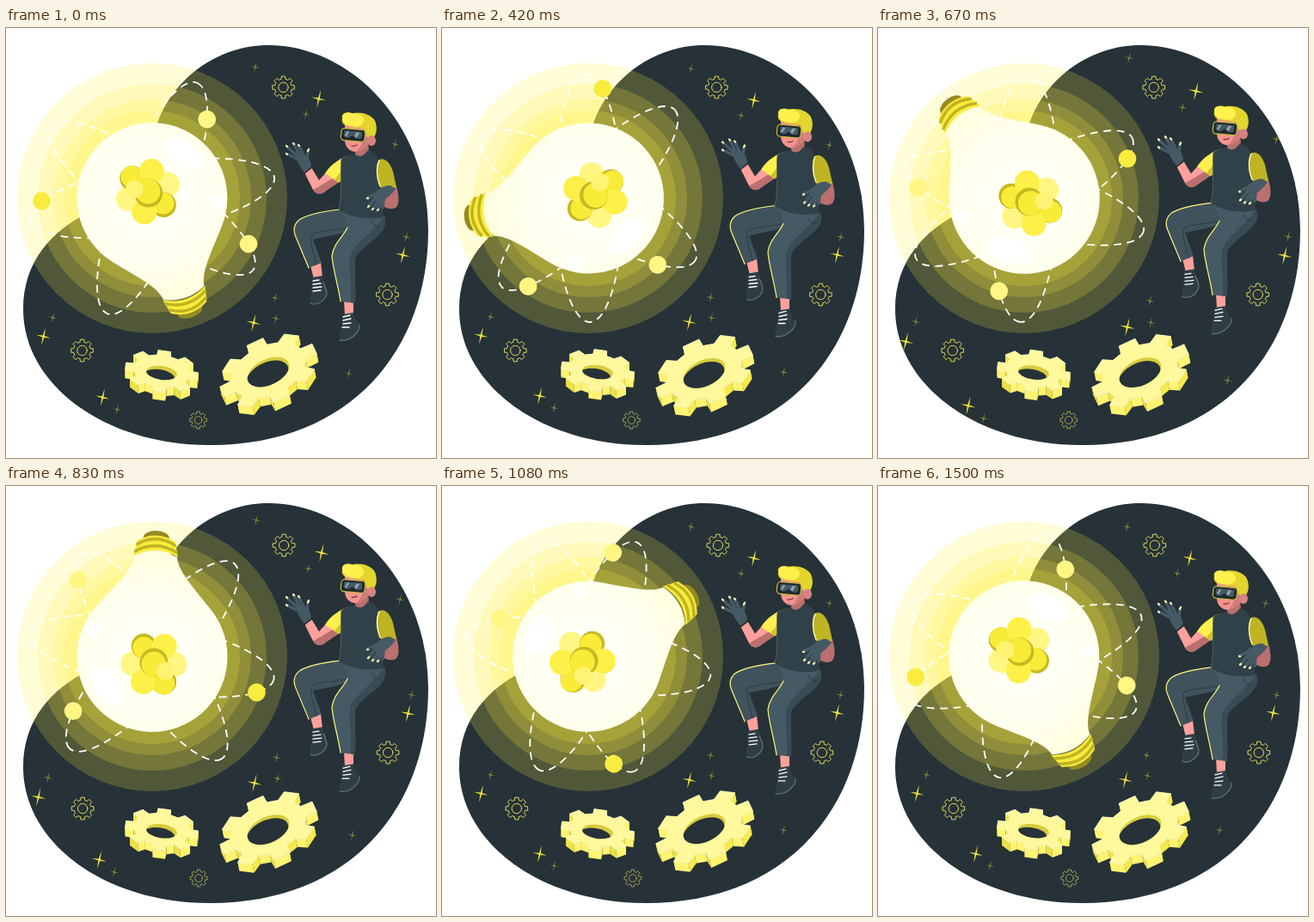
Animation, 500 px wide and 500 px high, one loop 1.54 s. Source, as an HTML page:

```html
<!DOCTYPE html>
<html lang="en">
<head>
<meta charset="utf-8">
<title>Idea lab</title>
<style>
html, body { margin: 0; width: 100%; height: 100%; overflow: hidden; background: #fff; }
svg { display: block; width: 100vw; height: 100vh; }
.line { fill: none; stroke-linecap: round; stroke-linejoin: round; }
.rim { stroke: #fff47a; stroke-width: 1.2; }
.fold { stroke: #2c3b44; stroke-width: 1; }
.lace { stroke: #fff; stroke-width: 1.3; }
.sole { stroke: #5d707a; stroke-width: 1.3; }
.glove { stroke: #455a64; stroke-width: 3.6; }
.tip { stroke: #fff3b8; stroke-width: 2.4; }
.skin { fill: #ffa09c; }
.shade { fill: #b9706f; }
.shoe { fill: #2f3d45; }
</style>
</head>
<body>
<svg viewBox="0 0 500 500">
  <defs>
    <path id="blob" d="M305 20C400 20 491 110 491 235C491 372 403 485 237 485C114 485 20 414 20 327C20 270 55 235 95 215C150 185 160 150 177 108C195 60 245 20 305 20Z"/>
    <clipPath id="inBlob"><use href="#blob"/></clipPath>
    <radialGradient id="glass" gradientUnits="userSpaceOnUse" cx="0" cy="0" r="122">
      <stop offset="0" stop-color="#fffffa"/>
      <stop offset=".7" stop-color="#ffffed"/>
      <stop offset="1" stop-color="#fffddc"/>
    </radialGradient>
  </defs>

  <use href="#blob" fill="#263238"/>
  <g clip-path="url(#inBlob)"><g id="stars"></g></g>
  <g id="outlines" class="line"></g>
  <g id="cogA"></g>
  <g id="cogB"></g>

  <g id="halo" fill="#ffee3c" fill-opacity=".2"></g>
  <g id="lamp">
    <g id="orbits" class="line" stroke="#fff" stroke-width="1.8" stroke-dasharray="9 6.5" style="stroke-linecap:butt"></g>
    <g transform="rotate(1.3)">
      <path d="M-25-116C-27-100-42-85-66-57A87.500 87.500 0 1 0 66-57C42-85 27-100 25-116Q0-128-25-116Z" fill="url(#glass)"/>
      <ellipse cy="-138" rx="15" ry="8" fill="#958b20"/>
      <path d="M-26-116Q0-131 26-116L22-134Q0-147-22-134Z" fill="#f8eb3c"/>
      <g class="line" stroke="#bfb322" stroke-width="3.4" style="stroke-linecap:butt">
        <path d="M-25-121Q0-136 25-121"/>
        <path d="M-23-129Q0-144 23-129"/>
      </g>
    </g>
    <g fill="#fff">
      <circle cx="-70" cy="-30" r="8"/>
      <ellipse cx="-52" cy="36" rx="14" ry="26" transform="rotate(-35 -52 36)"/>
    </g>
    <g id="core"></g>
    <g id="electrons"></g>
  </g>

  <g id="man">
    <!-- far leg -->
    <path d="M354 276L366 272L368 290L358 292Z" class="skin"/>
    <path d="M356 290L368 288C370 296 375 304 373 310C370 318 362 322 356 321C352 318 354 312 355 305Z" class="shoe"/>
    <path d="M369 296C373 304 374 309 372 312C368 319 360 323 354 320" class="line sole"/>
    <path d="M357 294L364 293M357 298L366 297M357 302L367 301M357 306L366 305" class="line lace"/>
    <path d="M388 211C370 213 350 217 341 223C334 229 334 236 337 243L352 279L367 273L357 246C372 242 392 240 405 232Z" fill="#40535d"/>
    <path d="M388 211C370 213 350 217 341 223C334 229 334 236 337 243L352 279" class="line rim"/>
    <path d="M400 231C384 236 366 235 356 240C352 246 357 258 361 275" class="line fold"/>
    <!-- near leg -->
    <path d="M393 317L404 316L404 332L394 334Z" class="skin"/>
    <path d="M391 333L404 331C406 340 412 345 410 352C406 360 398 365 390 364C386 362 387 356 390 349Z" class="shoe"/>
    <path d="M411 345C412 353 401 365 388 363" class="line sole"/>
    <path d="M392 336L400 334M392 340L401 338M392 344L401 343M391 348L399 348" class="line lace"/>
    <path d="M387 209C400 219 425 224 440 219C443 227 440 234 434 240C424 250 410 258 406 268C405 285 407 300 406 320L389 318C386 298 380 280 379 265C381 250 392 243 396 232C398 224 392 218 387 209Z" fill="#455a64"/>
    <path d="M440 219C443 227 440 234 434 240C424 250 410 258 406 268C405 285 407 300 406 320L401 319C402 300 399 284 400 266C404 252 424 240 440 219Z" fill="#394b54"/>
    <path d="M397 232C392 243 381 250 379 265C380 280 386 298 389 318" class="line rim"/>
    <path d="M425 224Q427 231 436 232" class="line fold"/>
    <!-- far arm -->
    <path d="M373 167L364 177L355 162L347 168L357 188C361 194 367 194 371 190L388 178Z" class="skin"/>
    <path d="M388 170L366 183L357 188C361 194 367 194 371 190L389 178Z" class="shade"/>
    <path d="M401 148C390 150 378 158 371 169L387 180C393 176 391 160 401 148Z" fill="#fff04d"/>
    <path d="M394 162L382 176L387 180C392 176 393 168 394 162Z" fill="#d1c426"/>
    <path d="M347 168L355 161C354 154 352 150 348 148L338 146C337 153 341 161 347 168Z" fill="#455a64"/>
    <path d="M340 153L328 147M338 148L328 139M341 147L335 136M346 148L341 138M350 152L351 144" class="line glove"/>
    <path d="M327 147L326 146M327 138L326 137M335 135L334 134M341 137L340 136M351 143L352 141" class="line tip"/>
    <path d="M347 169L356 162" class="line" stroke="#1d272c" stroke-width="1.5"/>
    <!-- neck and vest -->
    <path d="M407 136L421 128L422 145C418 152 410 152 406 147Z" class="shade"/>
    <path d="M390 152C395 149 401 147 406 147Q413 153 421 142C431 145 435 152 434 162C432 180 437 203 439 219C425 224 400 221 387 211C392 195 388 170 390 152Z" fill="#31414a"/>
    <path d="M390 153C388 170 392 195 387 211" class="line" stroke="#55656d" stroke-width=".9"/>
    <!-- near arm -->
    <path d="M439 184L454 184C457 194 458 205 453 209C447 212 440 209 437 205Z" class="shade"/>
    <path d="M433 154C440 149 447 157 450 167L454 185C448 189 440 189 435 185C431 175 429 162 433 154Z" fill="#c0b424"/>
    <path d="M434 154C430 163 431 175 435 184" class="line" stroke="#fffbc4" stroke-width="1.3"/>
    <path d="M453 187L447 183C439 183 432 188 428 193L432 201L437 202C443 198 449 193 453 187Z" fill="#455a64"/>
    <path d="M430 193L421 197M430 197L423 206M433 200L428 209M436 200L433 210M439 198L438 209" class="line glove"/>
    <path d="M421 198L420 198M422 207L421 208M427 210L426 211M433 211L432 212" class="line tip"/>
    <!-- head -->
    <path d="M394 112L420 112L424 128C422 136 415 143 406 144C398 143 394 137 394 130Z" fill="#f4948f"/>
    <path d="M416 118L423 124C424 134 416 142 407 144C414 138 417 128 416 118Z" fill="#cf7c7a"/>
    <path d="M416 120L422 122" class="line" stroke="#20292e" stroke-width="4"/>
    <path d="M391 105C390 99 397 97 403 99C412 97 425 100 429 108C432 115 431 122 428 127L420 127L416 117C408 116 400 115 394 113C391 111 390 108 391 105Z" fill="#e3d52e"/>
    <path d="M391 104C390 99 397 97 403 100C409 98 417 102 416 108C415 114 408 116 402 114C396 114 391 110 391 104Z" fill="#fff04d"/>
    <ellipse cx="425" cy="131" rx="5" ry="6" fill="#d98381"/>
    <g transform="rotate(5 404 125)">
      <rect x="389.500" y="117.500" width="28" height="14" rx="4" fill="#20292e" stroke="#cabf3c" stroke-width="1.2"/>
      <path d="M393 120H414V127Q412 129 407 128L403 125L399 128Q394 129 393 126Z" fill="#455a64"/>
      <path d="M396 121L399 121L396 127L394 126ZM407 121L411 121L408 127L405 126Z" fill="#90a4ae"/>
    </g>
    <path d="M402 137Q405 138 408 136" class="line" stroke="#80302f" stroke-width="1.3"/>
  </g>
</svg>
<script>
const $ = id => document.getElementById(id);
const { sin, cos, exp, PI } = Math;
const RAD = PI / 180, FRAMES = 37, STEP = 1000 / 24, LOOP = 1540;
const fill = (id, items, draw) => { $(id).innerHTML = items.map(draw).join(''); };
const disc = (x, y, r, color) => `<circle cx="${x}" cy="${y}" r="${r}" fill="${color}"/>`;
const poly = (pts, attrs) => `<polygon points="${pts.map(p => p.map(n => n.toFixed(1))).join(' ')}" ${attrs}/>`;

// Point on an ellipse whose long axis is turned by tilt (degrees)
function onEllipse(rx, ry, tilt, angle) {
  const x = rx * cos(angle), y = ry * sin(angle), c = cos(tilt * RAD), s = sin(tilt * RAD);
  return [x * c - y * s, x * s + y * c];
}

// Eight-toothed outline
function cogPoints(cx, cy, rx, ry, tilt) {
  const pts = [];
  for (let k = 0; k < 8; k++) {
    for (const [off, r] of [[-.31, .77], [-.22, 1], [.22, 1], [.31, .77]]) {
      const [x, y] = onEllipse(rx * r, ry * r, tilt, (k + off) * PI / 4);
      pts.push([cx + x, cy + y]);
    }
  }
  return pts;
}

function solidCog(id, cx, cy, rx, ry, tilt, hx, hy, ex, ey) {
  const pts = cogPoints(cx, cy, rx, ry, tilt);
  const walls = pts.map((p, i) => [p, pts[(i + 1) % pts.length]])
    .sort((a, b) => a[0][1] + a[1][1] - b[0][1] - b[1][1])
    .map(([p, q]) => {
      const slope = (q[1] - p[1]) / Math.hypot(q[0] - p[0], q[1] - p[1]);
      const color = slope < -.5 ? '#eee04a' : slope > .6 ? '#f6e94c' : '#fff372';
      return poly([p, q, [q[0] + ex, q[1] + ey], [p[0] + ex, p[1] + ey]], `fill="${color}"`);
    });
  const hole = (x, y, attrs) =>
    `<ellipse cx="${x}" cy="${y}" rx="${hx}" ry="${hy}" transform="rotate(${tilt} ${x} ${y})" ${attrs}/>`;
  const top = cy + 2;
  $(id).innerHTML = walls.join('') +
    poly(pts, 'fill="#fff89c" stroke="#fffbc8" stroke-width=".8" stroke-linejoin="round"') +
    `<clipPath id="${id}Hole">${hole(cx, top, '')}</clipPath>` +
    hole(cx, top, 'fill="#d8cb3d"') +
    `<g clip-path="url(#${id}Hole)">${hole(cx + ex - 3, top + ey * .4, 'fill="#263238"')}</g>`;
}
solidCog('cogA', 181, 399, 43, 24, 8, 18, 8, 0, 10);
solidCog('cogB', 305, 398, 60, 37, -25, 26, 15, 2, 10);

fill('halo', [157, 133, 115, 102], r => `<circle cx="170" cy="198" r="${r}"/>`);

fill('outlines', [[322, 69, 13], [443, 310, 13], [88, 375, 13], [223, 456, 10]],
  ([x, y, r]) => `<g stroke="#dfd45a" stroke-opacity="${r > 10 ? 1 : .65}">` +
    poly(cogPoints(x, y, r, r, 0), '') + `<circle cx="${x}" cy="${y}" r="${r * .44}"/></g>`);

const star = (size, color) => ([x, y]) =>
  `<path transform="translate(${x} ${y}) rotate(13) scale(${size})" fill="${color}"
    d="M0-10.500L1-1L8.500 0L1 1L0 10.500L-1 1L-8.500 0L-1-1Z"/>`;
const bigStars = [[364, 82], [462, 264], [43, 359], [112, 430], [288, 343]];
const smallStars = [[290, 45], [349, 100], [453, 135], [466, 243], [399, 402],
  [313, 314], [314, 338], [54, 337], [129, 444]];
$('stars').innerHTML = bigStars.map(star(1, '#f0e23a')).join('') +
  smallStars.map(star(.6, '#8f8a38')).join('');

// Tilt of each orbit and where its electron sits
const orbits = [[10, 28, '#f9ec3f'], [55, 148, '#fff684'], [131, 41, '#fff684']];
fill('orbits', orbits, ([tilt]) => `<ellipse rx="144" ry="40" transform="rotate(${tilt})"/>`);
fill('electrons', orbits, ([tilt, at, color]) => disc(...onEllipse(144, 40, tilt, at * RAD), 10.4, color));

const plain = color => (x, y, r) => disc(x, y, r, color);
const shaded = (x, y, r) => disc(x, y, r, '#c6ba22') + disc(x, y + r * .13, r * .87, '#f9ec38');
const kinds = [plain('#fff684'), shaded, plain('#fdf048')];
fill('core', [0, 3, 4, 5, 1, 2], k => kinds[k % 3](2 + 24 * cos(k * PI / 3), 9 + 24 * sin(k * PI / 3), 14.5));
$('core').innerHTML += shaded(2, 7, 16.5) + disc(16, 17, 10.5, '#fff373');

const move = (id, t) => $(id).setAttribute('transform', t);
const pulse = (f, mid) => exp(-(((f - mid) / 2.5) ** 2));
function render(now) {
  // 24 pictures a second, start times rounded to 10 ms
  const f = Math.floor((now % LOOP + 4) / STEP) % FRAMES;
  const w = 2 * PI * f / FRAMES;
  const spin = 160.2 + w / RAD + 2.8 * (1 - cos(w)) - 1.5 * sin(w);
  const zoom = .988 + .095 * (pulse(f, 3.8) + pulse(f, 17.6));
  move('lamp', `translate(170 198) rotate(${spin})`);
  move('stars', `translate(250 248) scale(${zoom}) translate(-250 -248)`);
  move('outlines', `translate(${2.2 * cos(2 * w - .88) - .9} 0)`);
  move('man', `translate(0 ${-4 * (1 - cos(w))})`);
  move('cogA', `translate(0 ${-sin(w)})`);
  move('cogB', `translate(0 ${1.4 * sin(w)})`);
}
const start = performance.now();
(function tick() {
  render(performance.now() - start);
  requestAnimationFrame(tick);
})();
</script>
</body>
</html>
```
